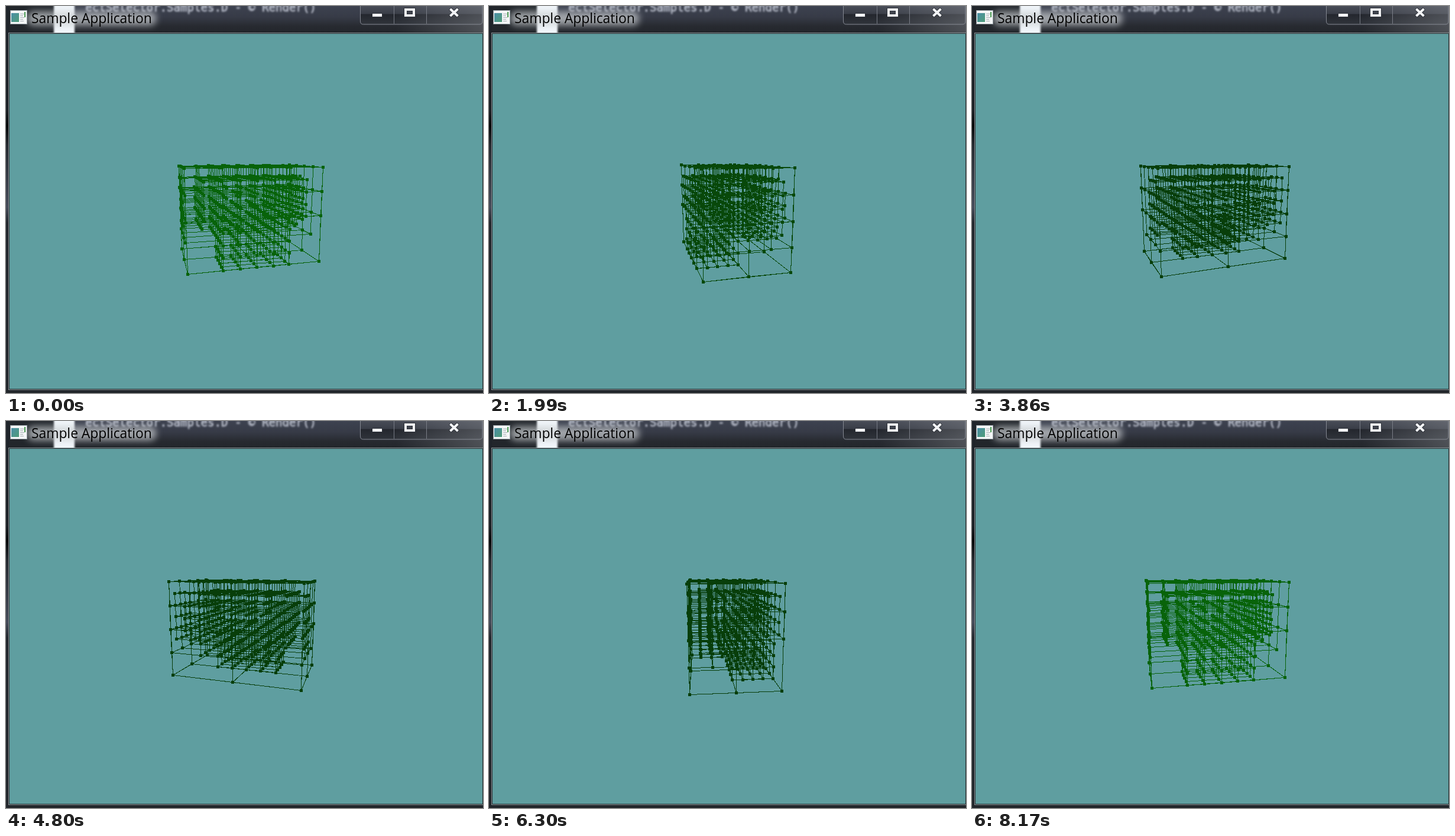
Animation of 807x654 px, one loop 8250 ms. Source, as an HTML page:

```html
<!DOCTYPE html>
<html lang="en">
<head>
<meta charset="utf-8">
<title>Sample Application</title>
<style>
html, body { margin: 0; width: 100%; height: 100%; overflow: hidden; background: #20242a; }
svg { display: block; }
.title { font: 22.8px "Open Sans", "Noto Sans", sans-serif; }
.code { font: 19.1px "DejaVu Sans Mono", monospace; }
.crisp { shape-rendering: crispEdges; }
</style>
</head>
<body>
<svg width="807" height="654" viewBox="0 0 807 654">
  <defs>
    <linearGradient id="bar" x2="0" y2="1">
      <stop offset="0" stop-color="#3d4250"/><stop offset=".4" stop-color="#373b47"/>
      <stop offset=".75" stop-color="#272a30"/><stop offset="1" stop-color="#22262b"/>
    </linearGradient>
    <linearGradient id="side" x2="0" y2="1">
      <stop offset="0" stop-color="#20252b"/><stop offset=".27" stop-color="#1b1f24"/>
      <stop offset=".31" stop-color="#050607"/><stop offset=".36" stop-color="#24282e"/>
      <stop offset=".52" stop-color="#454a58"/><stop offset=".56" stop-color="#22262c"/>
      <stop offset="1" stop-color="#22262b"/>
    </linearGradient>
    <linearGradient id="button" x2="0" y2="1">
      <stop offset="0" stop-color="#4a4e59"/><stop offset=".45" stop-color="#3a3e48"/>
      <stop offset=".5" stop-color="#24272e"/><stop offset="1" stop-color="#30343b"/>
    </linearGradient>
    <linearGradient id="shine">
      <stop offset="0" stop-color="#8a8d92" stop-opacity="0"/>
      <stop offset="1" stop-color="#8a8d92" stop-opacity=".4"/>
    </linearGradient>
    <linearGradient id="pane" x2="1" y2="1">
      <stop offset="0" stop-color="#4b8fa8"/><stop offset="1" stop-color="#4f9c78"/>
    </linearGradient>
    <filter id="soft"><feGaussianBlur stdDeviation="1.8"/></filter>
    <filter id="glow" x="-20%" y="-80%" width="140%" height="260%"><feGaussianBlur stdDeviation="6"/></filter>
  </defs>

  <rect width="807" height="654" fill="#22262b"/>
  <rect x="100" width="707" height="46" fill="url(#bar)"/>
  <rect width="5" height="654" fill="url(#side)"/>
  <g filter="url(#soft)">
    <rect x="81" y="-8" width="35" height="60" fill="#f2f7fb"/>
    <text class="code" x="525" y="9" text-anchor="end" fill="#b9becb" stroke="#b9becb" stroke-width=".8">ectSelector.Samples.D - © Render()</text>
  </g>
  <rect x="36" y="9" width="218" height="24" rx="10" fill="#c9cdd0" opacity=".72" filter="url(#glow)"/>

  <g class="crisp">
    <rect x="7" y="7" width="28" height="23" fill="#f4f6f7" stroke="#8d979d"/>
    <rect x="9" y="12" width="13" height="15" fill="url(#pane)"/>
    <path d="M24 13h7M24 16h5M24 19h7M24 22h5M24 25h6" stroke="#a5adb2"/>
    <path d="M32 10v9" stroke="#499a52" stroke-width="2"/>
  </g>
  <text class="title" x="43" y="28.5">Sample Application</text>

  <path d="M599.5 -2V26q0 5 5 5H801q5 0 5-5V-2z" fill="url(#button)" stroke="#858993"/>
  <path d="M656.5 0V30M711.5 0V30" stroke="#777b85"/>
  <rect x="660" width="147" height="46" fill="url(#shine)"/>
  <g fill="none" stroke="#30343c" stroke-width="6">
    <path d="M619 15.5h18" stroke-width="7"/>
    <path d="M676 6h14v10h-14z"/>
    <path d="M751 4.5l14 13M765 4.5l-14 13"/>
  </g>
  <g fill="none" stroke="#f3f4f6" stroke-width="4">
    <path d="M620 15.5h16" stroke-width="5"/>
    <path d="M676 6h14v10h-14z"/>
    <path d="M751.5 5l13 12M764.5 5l-13 12"/>
  </g>

  <g class="crisp">
    <rect x="4.5" y="45.5" width="803" height="603" fill="none" stroke="#8d989c"/>
    <rect x="5.5" y="46.5" width="801" height="601" fill="#5f9ea0" stroke="#22292c"/>
    <path id="lines" fill="none"/>
    <path id="dots"/>
  </g>
</svg>

<script>
const LOOP = 8250, LAST = 105;
const SIZE = [1.268, .9145, .788];            // box: width, height, depth
const EXTENT = [1.367, .984, .852];           // half size of the enclosed model
const FOCAL = 519.6, DIST = 3.092, RISE = .543;
const TILT = Math.atan(RISE / DIST), CT = Math.cos(TILT), ST = Math.sin(TILT);

// Start of the first and of the eleventh step in each run.
const RUNS = [[70, 830], [930, 1690], [1770, 2520], [2600, 3390], [3480, 4250],
  [4330, 5110], [5190, 5980], [6060, 6850], [6940, 7700], [7780, 8560]];

// Rounded solids of a head: centre, radii, roundness (1 = ellipsoid).
const SOLIDS = [
  [[0, .3, -.1], [.87, .684, .75], .8],       // skull
  [[0, -.4, .44], [.5, .584, .41], .5],       // jaw
  [[.4, .32, .6], [.37, .3, .24], .45],       // eyes
  [[1.03, .14, -.33], [.337, .37, .2], .6]    // ears
];

const power = (v, e) => Math.sign(v) * Math.abs(v) ** e;

// Octree nodes touched by the surfaces, as "x,y,z,size" on a grid of eight.
function buildNodes() {
  const nodes = new Set(["0,0,0,8"]);
  const add = point => {
    const cell = point.map((v, i) => Math.max(0, Math.min(7, Math.floor((v / EXTENT[i] + 1) * 4))));
    for (const s of [1, 2, 4]) nodes.add([...cell.map(c => c - c % s), s].join());
  };
  for (const [c, r, e] of SOLIDS)
    for (let i = 0; i <= 60; i++)
      for (let j = 0; j < 120; j++) {
        const lat = (i / 60 - .5) * Math.PI, lon = j / 60 * Math.PI;
        const ring = power(Math.cos(lat), e);
        const x = c[0] + r[0] * ring * power(Math.cos(lon), e);
        const y = c[1] + r[1] * power(Math.sin(lat), e);
        const z = c[2] + r[2] * ring * power(Math.sin(lon), e);
        add([x, y, z]);
        add([-x, y, z]);
      }
  return nodes;
}

// Shared corners and edges of all node boxes.
const corners = new Map(), edges = new Map();
for (const node of buildNodes()) {
  const [x, y, z, s] = node.split(",").map(Number);
  const ids = [];
  for (let k = 0; k < 8; k++) {
    const p = [x + (k & 1) * s, y + (k >> 1 & 1) * s, z + (k >> 2) * s];
    corners.set(p.join(), p);
    ids.push(p.join());
  }
  for (let k = 0; k < 8; k++)
    for (const bit of [1, 2, 4])
      if (!(k & bit)) edges.set(ids[k] + "|" + ids[k | bit], [ids[k], ids[k | bit]]);
}

function project(p, cos, sin) {
  const [x, y, z] = p.map((v, i) => (v / 8 - .5) * SIZE[i]);
  const side = x * cos - z * sin, depth = DIST - x * sin - z * cos, drop = RISE - y;
  const scale = FOCAL / (depth * CT + drop * ST);
  return [Math.round(405.5 + side * scale), Math.round(347 + (drop * CT - depth * ST) * scale)];
}

function stepAt(t) {
  let step = 0;
  RUNS.forEach(([from, to], i) => {
    if (t >= from) step = 1 + 11 * i + Math.min(10, Math.floor((t - from) / (to - from) * 10 + .1));
  });
  return Math.min(step, LAST);
}

const lines = document.getElementById("lines"), dots = document.getElementById("dots");

function draw(step) {
  const angle = -.265 + .0602 * step, cos = Math.cos(angle), sin = Math.sin(angle);
  const at = new Map();
  let squares = "", strokes = "";
  for (const [id, p] of corners) {
    const [x, y] = project(p, cos, sin);
    at.set(id, `${x + .5} ${y + .5}`);
    squares += `M${x - 2} ${y - 2}h5v5h-5z`;
  }
  for (const [a, b] of edges.values()) strokes += `M${at.get(a)}L${at.get(b)}`;
  const light = Math.max(0, cos);
  const color = `rgb(8,${Math.round(62 + 38 * light)},10)`;
  lines.setAttribute("d", strokes);
  lines.setAttribute("stroke", color);
  dots.setAttribute("d", squares);
  dots.setAttribute("fill", color);
}

let shown = -1;
const begin = performance.now();
function tick() {
  const step = stepAt((performance.now() - begin) % LOOP);
  if (step !== shown) draw(shown = step);
  requestAnimationFrame(tick);
}
tick();
</script>
</body>
</html>
```
